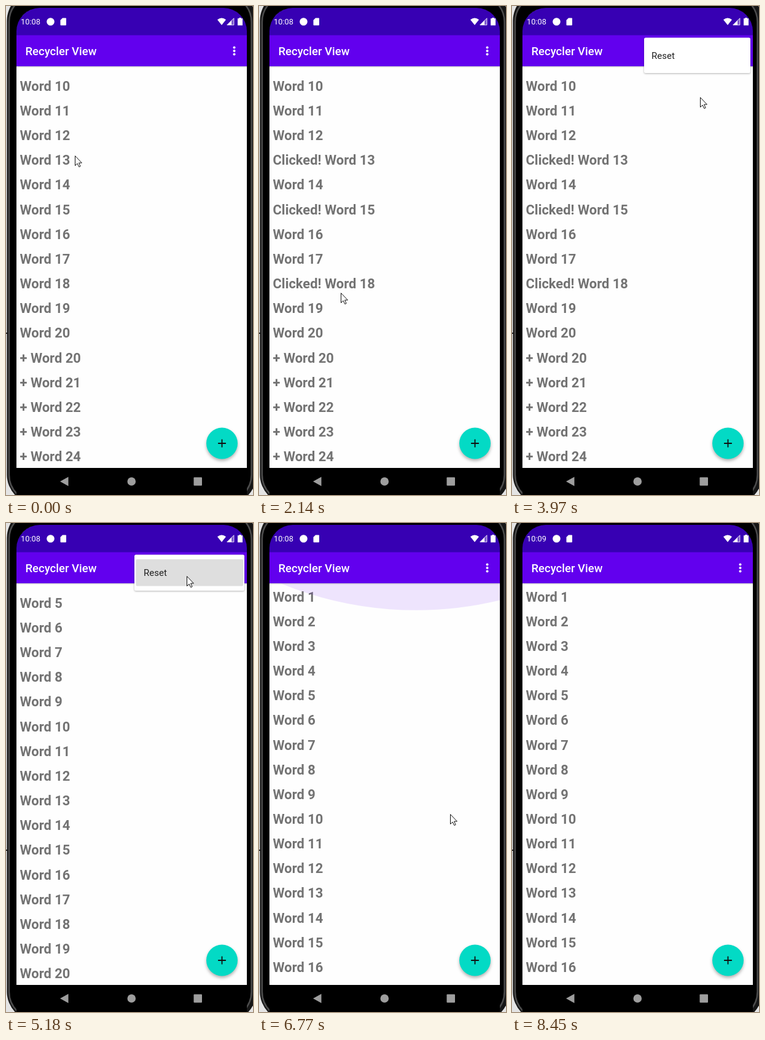
An HTML page for the animation above (9.49 s loop, 402x795 px).

```html
<!DOCTYPE html>
<html lang="en">
<head>
<meta charset="utf-8">
<title>Recycler View</title>
<style>
  html, body { margin: 0; width: 100%; height: 100%; overflow: hidden; background: #e4e4e4; }
  svg { display: block; width: 100%; height: 100%; }
  text { font-family: Roboto, "Noto Sans", sans-serif; white-space: pre; }
  #list text { font-size: 21.9px; font-weight: 700; fill: #737373; }
  #fab { filter: drop-shadow(0 3px 2.5px rgba(0, 0, 0, .3)); }
  #panel { filter: drop-shadow(0 1px 1.5px rgba(0, 0, 0, .3)); }
</style>
</head>
<body>
<svg viewBox="0 0 402 795">
  <defs>
    <clipPath id="screen"><rect x="17" y="3" width="375" height="840" rx="38"/></clipPath>
    <linearGradient id="shade" x2="0" y2="1">
      <stop stop-color="#000" stop-opacity=".2"/>
      <stop offset="1" stop-color="#000" stop-opacity="0"/>
    </linearGradient>
  </defs>

  <!-- phone body -->
  <rect y="531" width="2" height="2" fill="#222"/>
  <rect x="1.5" y="-24" width="406" height="834" rx="48" fill="#161616"/>
  <rect x="5" y="-18" width="394.500" height="824" rx="44" fill="#000" stroke="#4c4c4c" stroke-width="2.5"/>

  <g clip-path="url(#screen)">
    <rect x="17" y="98" width="375" height="653" fill="#fefefe"/>
    <g id="list"></g>
    <path id="glow" d="M36 0A579 579 0 0 0 392 27V0Z" fill="#6200ee"/>
    <rect x="17" y="98" width="375" height="2.5" fill="url(#shade)"/>

    <rect x="17" y="3" width="375" height="45" fill="#3700b3"/>
    <rect x="17" y="47.500" width="375" height="50.500" fill="#6200ee"/>
    <text x="31.500" y="80" font-size="18.500" font-weight="500" fill="#fff">Recycler View</text>
    <circle id="ripple" cx="371.500" cy="73.500" fill="#fff"/>
    <g fill="#fff">
      <circle cx="371.500" cy="67.600" r="2"/>
      <circle cx="371.500" cy="73.100" r="2"/>
      <circle cx="371.500" cy="78.600" r="2"/>
      <text id="clock" x="24" y="30" font-size="12.8"></text>
      <circle cx="72.500" cy="25.500" r="6.300"/>
      <path d="M92 19.500H97Q98 19.500 98 20.500V30.500Q98 31.500 97 31.500H89.500Q88.500 31.500 88.500 30.500V23Z"/>
      <path d="M351 31L344 22.300Q351 16.600 358 22.300Z"/>
      <path d="M371 19.500V31H359.500Z" opacity=".35"/>
      <path d="M367 23.500V31H359.500Z"/>
      <path d="M359.800 30.900H370.900V19.800Z" fill="none" stroke="#fff" stroke-width=".8"/>
      <path d="M379.500 19H382.500V20.300H385V31.500H377V20.300H379.500Z"/>
    </g>

    <circle id="fab" cx="351.500" cy="711" r="25.500" fill="#03dac5"/>
    <path d="M345.100 711H357.900M351.500 704.600V717.400" stroke="#111" stroke-width="1.8"/>

    <g id="menu">
      <rect id="panel" y="51.500" rx="2.5" fill="#fff"/>
      <rect id="press" x="211.500" y="59" width="174.500" height="43.500" rx="2" fill="#dedede"/>
      <text id="reset" y="86" font-size="15" fill="#212121">Reset</text>
    </g>

    <rect x="17" y="751" width="375" height="44" fill="#000"/>
    <g fill="#9e9e9e">
      <path d="M88 773L101.500 765.500V780.500Z"/>
      <circle cx="204.300" cy="773" r="6.800"/>
      <rect x="305.500" y="766.300" width="13.500" height="13.500" rx="1"/>
    </g>
  </g>

  <path id="cursor" d="M.5 .7V16.500L4.100 13.100L6.800 18.600L9.100 17.600L6.600 12.100H11.400Z" fill="#fff" stroke="#111"/>
</svg>

<script>
const LOOP = 9490, STEP = 120;
const PITCH = 40.15, TOP = 127.6;
const RESET = 5180;
const clicks = { 13: 530, 15: 1340, 18: 2140 };

// Pointer moves: start ms, number of steps, x, y
const moves = [
  [0, 1, 112, 243], [810, 2, 116, 329], [1480, 2, 133, 466], [2420, 1, 238, 251],
  [2820, 1, 378, 46], [2970, 3, 369, 67], [3970, 1, 306, 148], [4090, 2, 302, 163],
  [4380, 3, 294, 86], [5930, 2, 311, 473], [7540, 2, 319, 609], [7810, 1, 298, 635],
  [8210, 2, 257, 780]
];

const $ = id => document.getElementById(id);
const show = (el, on) => { el.style.display = on ? '' : 'none'; };
const set = (el, attrs) => { for (const k in attrs) el.setAttribute(k, attrs[k]); };
const clamp = v => Math.max(0, Math.min(1, v));
// Progress 0..1 in n held steps, the first one visible at start
const steps = (t, start, n) => clamp((Math.floor((t - start) / STEP) + 1) / n);
const easeOut = p => 1 - (1 - p) ** 2;

const rows = Array.from({ length: 26 }, () => {
  const row = document.createElementNS('http://www.w3.org/2000/svg', 'text');
  row.setAttribute('x', 22.5);
  return $('list').appendChild(row);
});

function label(n, t) {
  if (t >= RESET) return 'Word ' + n;
  if (n > 20) return '+ Word ' + (n - 1);
  return (t >= clicks[n] ? 'Clicked! ' : '') + 'Word ' + n;
}

function drawList(t) {
  const above = t < RESET ? 9 : 4;
  const scroll = (above * PITCH - 10.27) * (1 - steps(t, 6620, 2));
  rows.forEach((row, i) => {
    row.setAttribute('y', Math.round(TOP + i * PITCH - scroll));
    row.textContent = label(i + 1, t);
  });
}

function drawCursor(t) {
  let x = 0, y = 0;
  for (const [start, n, toX, toY] of moves) {
    const p = easeOut(steps(t, start, n));
    x += (toX - x) * p;
    y += (toY - y) * p;
  }
  set($('cursor'), { transform: `translate(${Math.round(x)} ${Math.round(y)})` });
  show($('cursor'), t < 2550 || (t >= 2820 && t < 8450));
}

function drawMenu(t) {
  const press = steps(t, 3580, 3);
  set($('ripple'), { r: 18 * Math.sqrt(press), opacity: .22 * press });
  show($('ripple'), t < 3970);

  const open = steps(t, 3970, 2);
  const left = 221 - 12 * open;
  set($('menu'), { opacity: 1 - steps(t, 5320, 3) });
  set($('panel'), { x: left, width: 388 - left, height: 56.5 + 2 * open });
  set($('reset'), { x: 230 - 6 * open });
  show($('menu'), open > 0);
  show($('press'), t >= RESET);
}

function drawGlow(t) {
  const fade = clamp((t - 6910) / 510);
  const swell = 1 + .08 * Math.sin(Math.PI * clamp((t - 6770) / 400));
  set($('glow'), { transform: `translate(0 98.5) scale(1 ${swell})`, opacity: .1 * (1 - fade) });
  show($('glow'), t >= 6770);
}

function draw(t) {
  drawList(t);
  drawMenu(t);
  drawGlow(t);
  drawCursor(t);
  $('clock').textContent = t < 7030 ? '10:08' : '10:09';
}

const start = performance.now();
function tick() {
  draw((performance.now() - start) % LOOP);
  requestAnimationFrame(tick);
}
tick();
</script>
</body>
</html>
```
